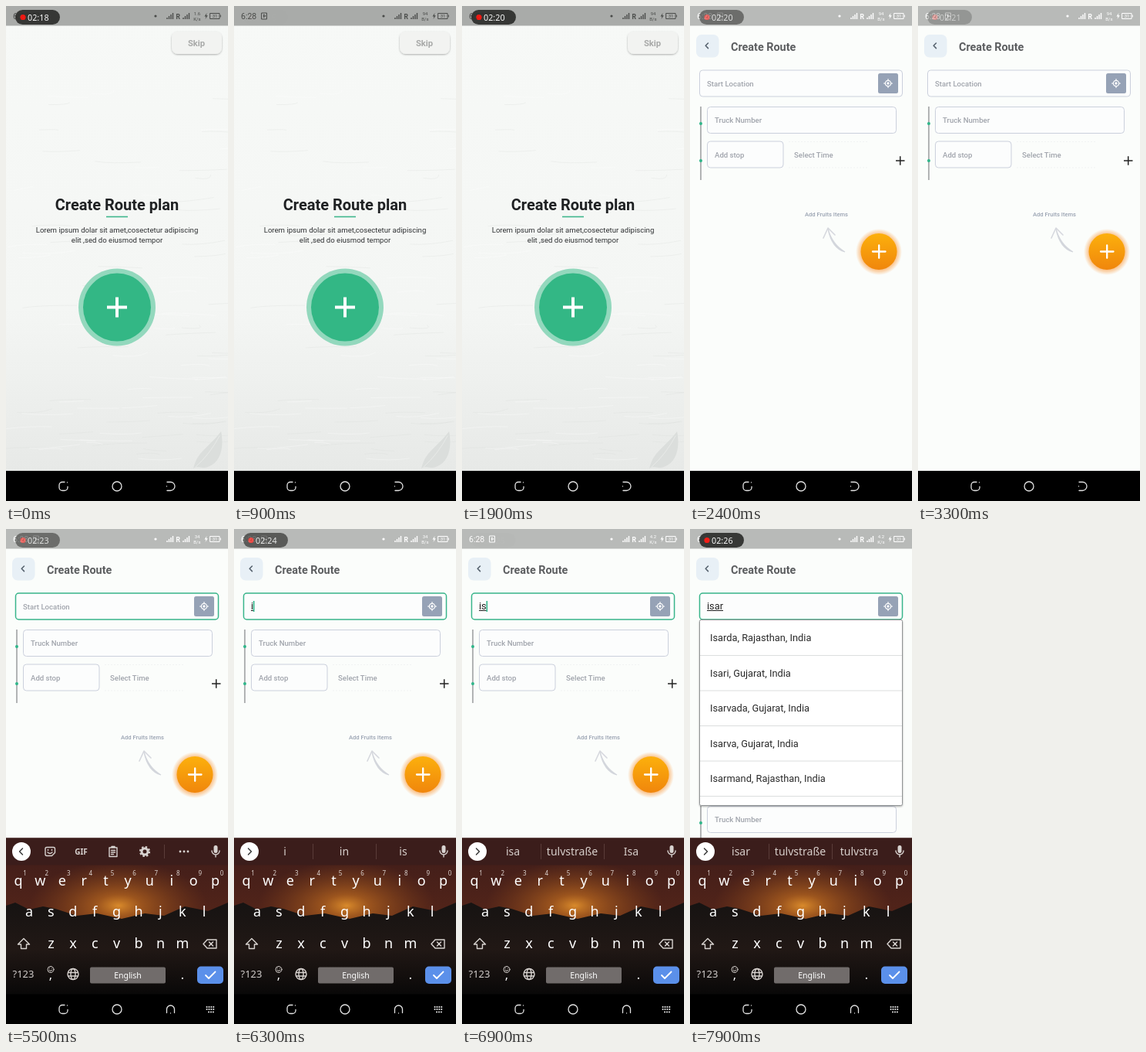
Animation, 288 px wide and 640 px high, one loop 8 s. Source, as an HTML page:

```html
<!DOCTYPE html>
<html lang="en">
<head>
<meta charset="utf-8">
<title>Create Route</title>
<style>
html, body { margin: 0; width: 100%; height: 100%; overflow: hidden; background: #000; }
svg { display: block; width: 288px; height: 640px; font-family: Roboto, sans-serif; }
.mid { text-anchor: middle; }
.line { fill: none; stroke-linecap: round; stroke-linejoin: round; }
.label { font-size: 9.6px; font-weight: 500; fill: #a0a4ac; }
.box { fill: #fcfdfd; stroke: #cbd0dc; }
.keys { font-family: "Noto Sans", sans-serif; fill: #fff; text-anchor: middle; }
.keys .line { stroke: #d8d3d0; stroke-width: 1.4; }
</style>
</head>
<body>
<svg viewBox="0 0 288 640">
  <defs>
    <linearGradient id="paper" x2="0" y2="1">
      <stop stop-color="#f7f9f7"/><stop offset=".65" stop-color="#f4f6f4"/><stop offset="1" stop-color="#e7e9e7"/>
    </linearGradient>
    <linearGradient id="orange" x2="0" y2="1">
      <stop stop-color="#fcb00c"/><stop offset="1" stop-color="#f0860c"/>
    </linearGradient>
    <radialGradient id="glow">
      <stop offset=".78" stop-color="#f9a04a" stop-opacity=".6"/><stop offset="1" stop-color="#f9a04a" stop-opacity="0"/>
    </radialGradient>
    <linearGradient id="dusk" x2="0" y2="1">
      <stop stop-color="#3d1c1a"/><stop offset=".6" stop-color="#572619"/><stop offset="1" stop-color="#70391a"/>
    </linearGradient>
    <radialGradient id="sun">
      <stop stop-color="#d98a2b"/><stop offset=".25" stop-color="#b5651f" stop-opacity=".75"/><stop offset="1" stop-color="#8a4419" stop-opacity="0"/>
    </radialGradient>
    <linearGradient id="hills" x2="0" y2="1">
      <stop stop-color="#161312"/><stop offset=".5" stop-color="#211815"/><stop offset="1" stop-color="#090808"/>
    </linearGradient>
    <filter id="shadow" x="-20%" y="-20%" width="140%" height="150%">
      <feDropShadow dx="0" dy="1" stdDeviation="1" flood-opacity=".3"/>
    </filter>
  </defs>

  <g id="intro">
    <rect width="288" height="601" fill="url(#paper)"/>
    <g id="grain" class="line"></g>
    <path d="M243 598C248 576 262 572 279 550C283 570 279 590 262 596C254 599 248 594 243 598Z" fill="#dbdedc"/>
    <path class="line" d="M246 596Q264 580 277 556" stroke="#e8eae8"/>
    <rect x="215" y="33" width="65" height="29" rx="8" fill="#f2f3f1" filter="url(#shadow)"/>
    <text class="mid" x="247" y="51.500" font-size="11.2" font-weight="700" fill="#a8a9a8">Skip</text>
    <text class="mid" x="144" y="264" font-size="20" font-weight="700" fill="#1f2123">Create Route plan</text>
    <path d="M130 272.500h28" stroke="#3fb68c" stroke-width="1.600"/>
    <g class="mid" font-size="9.6" fill="#303234">
      <text x="144" y="292.500">Lorem ipsum dolar sit amet,cosectetur adipiscing</text>
      <text x="144" y="306">elit ,sed do eiusmod tempor</text>
    </g>
    <circle cx="144" cy="389.500" r="50" fill="#93d8bd"/>
    <circle cx="144" cy="389.500" r="44" fill="#33b785"/>
    <path d="M131 389.500h26M144 376.500v26" stroke="#fff" stroke-width="4"/>
  </g>

  <g id="route">
    <rect width="288" height="601" fill="#fbfdfb"/>
    <g id="content">
      <rect x="8" y="37" width="29.500" height="29.500" rx="7" fill="#e8f0f6"/>
      <path class="line" d="M23.500 48l-3.300 3.300 3.300 3.300" stroke="#54606c" stroke-width="1.500"/>
      <text x="53" y="57.500" font-size="14.4" font-weight="700" fill="#5c5e60">Create Route</text>
      <g id="stops">
        <path d="M14 130v95" stroke="#b2b4b5" stroke-width="2"/>
        <circle cx="14" cy="152" r="2" fill="#2fb68a"/><circle cx="14" cy="200" r="2" fill="#2fb68a"/>
        <rect class="box" x="22.500" y="130.500" width="245" height="34" rx="4"/>
        <rect class="box" x="22.500" y="175" width="98.500" height="34" rx="4"/>
        <path d="M128 175.500h104M128 209h104" stroke="#f1f3f3" stroke-dasharray="2 2"/>
        <text class="label" x="32" y="151">Truck Number</text>
        <text class="label" x="32" y="195.500">Add stop</text>
        <text class="label" x="135" y="195.500">Select Time</text>
        <path d="M267 200h11.500M272.700 194.200v11.500" stroke="#222" stroke-width="1.500"/>
        <text class="mid" x="177" y="272" font-size="7.6" font-weight="500" fill="#9aa3b2">Add Fruits Items</text>
        <path d="M201 318Q184 313 179 288Q184 308 201 318Z" fill="#d3d6dc" stroke="#d3d6dc" stroke-width="1.300"/>
        <path class="line" d="M173 300L179 287L188 296" stroke="#d6d8de" stroke-width="1.600"/>
        <circle cx="245" cy="318" r="30" fill="url(#glow)"/>
        <circle cx="245" cy="317.500" r="23.500" fill="url(#orange)"/>
        <path class="line" d="M237 317.500h16.500M245.200 309.300v16.500" stroke="#fff" stroke-width="2.300"/>
      </g>
      <rect id="field" class="box" x="12.500" y="83" width="263" height="34" rx="4"/>
      <text id="hint" class="label" x="22" y="103.500">Start Location</text>
      <text id="typed" x="22" y="103.500" font-size="12.8" fill="#222"></text>
      <path id="underline" stroke="#222"/>
      <path id="cursor" stroke="#2fb68a" stroke-width="1.600"/>
      <rect x="244" y="87" width="26" height="26" rx="2.500" fill="#96a2b6"/>
      <g class="line" stroke="#fff" stroke-width="1.200">
        <circle cx="257" cy="100" r="3.700"/><path d="M257 94.500v1.500M257 104v1.500M251.500 100h1.500M261 100h1.500"/>
      </g>
      <circle cx="257" cy="100" r="1.700" fill="#fff"/>
      <g id="results" font-size="12.8" fill="#2a2a2a"></g>
    </g>
  </g>

  <rect id="bar" width="288" height="25.500"/>
  <g id="status">
    <text x="9" y="17" font-size="10.500">6:28</text>
    <path class="line" d="M36 9h6.500v8h-6.500zM38.500 11.500v3l2.300-1.500z" stroke="currentColor"/>
    <circle cx="194" cy="13" r="1.600"/>
    <path d="M209 17v-2M211.500 17v-4M214 17v-6M216.500 17v-8M230 17v-2M232.500 17v-4M235 17v-6M237.500 17v-8" stroke="currentColor" stroke-width="1.400"/>
    <text x="220.500" y="16.500" font-size="8.500" font-weight="700">R</text>
    <g class="mid" font-size="6"><text id="rate" x="248" y="12"></text><text id="unit" x="248" y="18.500"></text></g>
    <path d="M260.500 9l-3 4.500h2l-1 3.500 3.300-4.800h-2z"/>
    <path class="line" d="M265 9.500h12v7h-12zM278.300 12v2" stroke="currentColor"/>
    <text class="mid" x="271" y="15.300" font-size="6">31</text>
  </g>
  <g id="pill">
    <rect x="12" y="5" width="58" height="19" rx="9.500" fill="#2e2f2d"/>
    <circle cx="22" cy="14.500" r="3.600" fill="#f5120b"/>
    <text id="clock" x="28" y="18.500" font-size="10.800" fill="#fff" font-family="Noto Sans, sans-serif"></text>
  </g>

  <g id="keyboard" class="keys">
    <rect y="399.500" width="288" height="202" fill="url(#dusk)"/>
    <ellipse cx="146" cy="487" rx="115" ry="58" fill="url(#sun)"/>
    <path d="M0 487L12 483L30 492L48 488L64 491L92 500L118 497L150 504L180 497L205 500L232 488L262 494L288 483V602H0Z" fill="url(#hills)"/>
    <rect y="399.500" width="288" height="35" fill="#3b1d1b"/>
    <circle cx="20" cy="417" r="12"/>
    <path id="chevron" class="line" style="stroke:#333"/>
    <g id="tools">
      <path class="line" d="M53 411.500h8.500a2 2 0 0 1 2 2v5l-4 4h-6.500a2 2 0 0 1-2-2v-7a2 2 0 0 1 2-2M54.500 414.500v1M59.500 414.500v1M54 418q3 3 6 0"/>
      <text x="97.500" y="420.500" font-size="10" font-weight="800" fill="#d8d3d0">GIF</text>
      <path class="line" d="M134 412h10v11.500h-10zM137 412v-1.500h4v1.500M136.500 415.500h5M136.500 418h5M136.500 420.500h3"/>
      <circle cx="180" cy="417" r="4" fill="none" stroke="#d8d3d0" stroke-width="3"/>
      <circle cx="180" cy="417" r="6" fill="none" stroke="#d8d3d0" stroke-width="2.200" stroke-dasharray="2.360"/>
      <path d="M205.500 408v18" stroke="#5a3c39"/>
      <path class="line" d="M226 417h0M231 417h0M236 417h0" style="stroke-width:2.800"/>
    </g>
    <g id="words" font-size="14" fill="#d8d0cc">
      <text x="66" y="422"></text><text x="143" y="422"></text><text x="219.500" y="422"></text>
      <path d="M102.500 407v20M184.500 407v20" stroke="#5a3c39"/>
    </g>
    <path class="line" d="M267 416a5 5 0 0 0 10 0M272 421v3"/>
    <rect x="269.500" y="409" width="5" height="10" rx="2.500" fill="#d8d3d0"/>
    <g id="letters" font-size="18"></g>
    <path class="line" d="M23 529.500l7.500 7.500h-4v5.500h-7v-5.500h-4zM261 531h12v11h-12l-5-5.500zM263.500 534l5 5M268.500 534l-5 5"/>
    <text x="22.500" y="580" font-size="13" fill="#d0ccca">?123</text>
    <circle class="line" cx="58" cy="569.500" r="4" style="stroke-width:1"/>
    <path class="line" d="M56 570.500q2 2 4 0M56.500 568h0M59.500 568h0" style="stroke-width:1"/>
    <g class="line"><circle cx="87" cy="575.500" r="7"/><ellipse cx="87" cy="575.500" rx="3" ry="7"/><path d="M80.500 573.500h13M80.500 578h13"/></g>
    <text x="58" y="582" font-size="16">,</text><text x="229" y="582" font-size="16">.</text>
    <rect x="109" y="566.500" width="98" height="21" rx="2" fill="#716c6b"/>
    <text x="158" y="581" font-size="10.500">English</text>
    <rect x="248" y="565.500" width="34" height="22.500" rx="5" fill="#5b90ea"/>
    <path class="line" d="M259 577l4 4 8.500-8.500" style="stroke:#fff;stroke-width:1.800"/>
  </g>

  <rect y="601.500" width="288" height="39"/>
  <g class="line" stroke="#e4e4e4" stroke-width="1.300">
    <path d="M76 615.500h-3a4 4 0 0 0-4 4v3a4 4 0 0 0 4 4h3a4 4 0 0 0 4-4v-1M79.500 616h0"/>
    <circle cx="144" cy="621" r="6"/>
    <path id="back" d="M209 615.500h4.500a5.500 5.500 0 0 1 0 11h-4.500M208.500 621h0"/>
    <path id="imeIcon" d="M260.500 618h11.500M260.500 621h11.500M263 624.500h6.500" stroke-width="2" stroke-dasharray=".1 2.800"/>
  </g>
</svg>
<script>
const el = Object.fromEntries([...document.querySelectorAll("[id]")].map(e => [e.id, e]));
const show = (e, on) => e.style.display = on ? "" : "none";
const latest = (steps, t) => steps.filter(s => s[0] <= t).pop();

// Static repeats
let seed = 7;
const random = () => (seed = seed * 16807 % 2147483647) / 2147483647;
for (let i = 0; i < 90; i++) {
  const x = random() * 280, y = 30 + 565 * Math.sqrt(random());
  const tone = i % 2 ? "#fff" : "#d9dcd9";
  el.grain.innerHTML += `<path d="M${x} ${y}q${15 + random() * 20} ${random() * 8 - 4} ${20 + random() * 50} ${random() * 8 - 5}" stroke="${tone}" stroke-width=".8" opacity=".4"/>`;
}

[["qwertyuiop", 16, 461], ["asdfghjkl", 30, 501], ["zxcvbnm", 58.5, 542]].forEach(([row, x0, y], r) => {
  [...row].forEach((key, i) => {
    const x = x0 + 28.4 * i;
    el.letters.innerHTML += `<text x="${x}" y="${y}">${key}</text>` +
      (r ? "" : `<text x="${x + 8.5}" y="448" font-size="8" fill="#ddd4d0">${(i + 1) % 10}</text>`);
  });
});

const places = ["Isarda, Rajasthan", "Isari, Gujarat", "Isarvada, Gujarat", "Isarva, Gujarat", "Isarmand, Rajasthan"];
el.results.innerHTML = `<rect x="12.500" y="117.500" width="263" height="240" rx="2" fill="#fff" stroke="#8f9394" filter="url(#shadow)"/>` +
  places.map((place, i) => `<text x="26" y="${145 + 45.6 * i}">${place}, India</text>
    <path d="M13 ${163.5 + 45.5 * i}h262" stroke="#dcdede"/>`).join("");

// Timed states, each starting at the given millisecond
const rates = [[0, "1.6", "K/s"], [800, "94", "B/s"], [3800, "34", "B/s"], [6700, "4.2", "K/s"]];
const typing = [
  [3800, "", []],
  [5900, "i", ["i", "in", "is"]],
  [6500, "is", ["isa", "tulvstraße", "Isa"]],
  [7000, "isa", ["isa", "tulvstraße", "Isa"]],
  [7300, "isar", ["isar", "tulvstraße", "tulvstra"]]
];
const backArrow = el.back.getAttribute("d");
const hideArrow = "M208.500 625.500v-4.500a5 5 0 0 1 10 0v4.500M213.500 626h0";

function draw(t) {
  const onRoute = t >= 2000, focused = t >= 3800, listed = t >= 7600;
  show(el.intro, !onRoute);
  show(el.route, onRoute);
  el.content.style.opacity = t < 2100 ? .5 : 1;
  el.bar.setAttribute("fill", onRoute ? "#b8bab8" : "#a9aba9");
  el.status.style.color = el.status.style.fill = onRoute ? "#fff" : "#4a4c4a";

  const [, rate, unit] = latest(rates, t);
  el.rate.textContent = rate;
  el.unit.textContent = unit;
  el.clock.textContent = "02:" + Math.floor(18 + (t + 100) / 1000);
  el.pill.style.opacity = .94 * (.5 + .5 * Math.cos(Math.PI * (t - 1950) / 1000));

  const [since, text, words] = latest(typing, t) || [0, "", []];
  el.field.style.stroke = focused ? "#38b58a" : "";
  el.field.style.strokeWidth = focused ? 1.5 : 1;
  el.typed.textContent = text;
  show(el.hint, !text);
  const end = 22 + (text ? el.typed.getComputedTextLength() : 0);
  el.underline.setAttribute("d", `M22 105.500H${end}`);
  show(el.underline, text);
  el.cursor.setAttribute("d", `M${end + .6} 93v14`);
  show(el.cursor, focused && (t - since) % 1000 < 500);
  show(el.results, listed);
  el.stops.setAttribute("transform", `translate(0 ${listed ? 228 : 0})`);

  show(el.keyboard, t >= 3900);
  show(el.tools, !text);
  show(el.words, text);
  el.words.querySelectorAll("text").forEach((e, i) => e.textContent = words[i] || "");
  el.chevron.setAttribute("d", text ? "M18.500 413l4 4-4 4" : "M21.500 413l-4 4 4 4");
  show(el.imeIcon, focused);
  el.back.setAttribute("d", focused ? hideArrow : backArrow);
}

function loop() {
  draw(Math.floor(performance.now() % 8000 / 100) * 100);
  requestAnimationFrame(loop);
}
loop();
</script>
</body>
</html>
```
